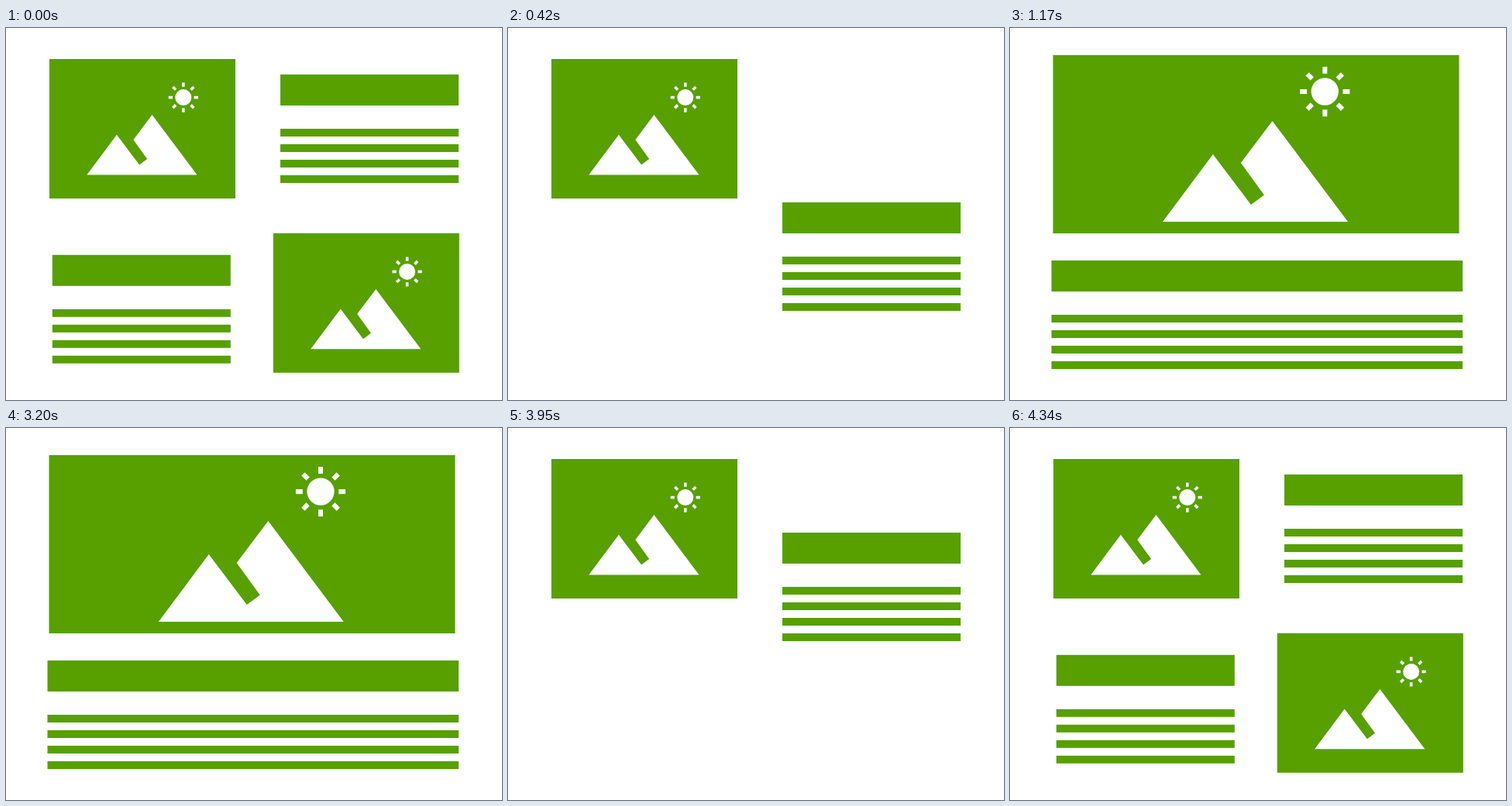
Animation, 640 px wide and 480 px high, one loop 6.34 s. Source, as an HTML page with a canvas:

```html
<!DOCTYPE html>
<html>
<head>
<meta charset="utf-8">
<style>
  html, body { margin: 0; width: 100%; height: 100%; overflow: hidden; background: #fff; }
  canvas { display: block; }
</style>
</head>
<body>
<canvas id="stage" width="640" height="480"></canvas>
<script>
const ctx = document.getElementById('stage').getContext('2d');
const GREEN = '#57a000';
const LOOP = 6340, BACK = 3170, TICK = 30;

// [start, length] of each stage in ticks, opening and closing
const STAGES = {
  row:  [[0, 9],       [30, 9]],
  text: [[10.266, 6],  [22.266, 6]],
  box:  [[19.4, 9],    [12.31, 9]],
  icon: [[28.8, 10.2], [0.7, 11.5]]
};

const PEAKS = [[0, 0], [38.6, -51.8], [67.8, -13.1], [77.9, -20.5],
               [60, -45.2], [84.2, -77.4], [142.2, 0]];

const mix = (a, b, p) => a + (b - a) * p;
const swing = t => (1 - Math.cos(Math.PI * Math.min(1, Math.max(0, t)))) / 2;

function progress(name, ms) {
  const closing = ms >= BACK;
  const tick = Math.floor((closing ? ms - BACK : ms) / TICK);
  const [start, length] = STAGES[name][+closing];
  const p = swing((tick - start) / length);
  return closing ? 1 - p : p;
}

function drawIcon(x, y, scale) {
  ctx.save();
  ctx.translate(x, y);
  ctx.scale(scale, scale);
  ctx.fillStyle = '#fff';
  ctx.beginPath();
  PEAKS.forEach(([px, py]) => ctx.lineTo(px, py));
  ctx.fill();
  ctx.translate(124.5, -99.9);
  ctx.beginPath();
  ctx.arc(0, 0, 10.5, 0, 2 * Math.PI);
  ctx.fill();
  for (let i = 0; i < 8; i++) {
    ctx.fillRect(13.8, -1.8, 5.3, 3.6);
    ctx.rotate(Math.PI / 4);
  }
  ctx.restore();
}

function drawPicture(dx, dy, box, icon) {
  const left = mix(56, 55.5, box), top = mix(40, 35, box);
  ctx.fillStyle = GREEN;
  ctx.fillRect(left + dx, top + dy, mix(296, 579.5, box) - left, mix(220, 265, box) - top);
  drawIcon(mix(104.3, 197, icon) + dx, mix(189.5, 250, icon) + dy, mix(1, 1.681, icon));
}

function drawText(left, right, top) {
  ctx.fillStyle = GREEN;
  ctx.fillRect(left, top, right - left, 40);
  for (let i = 0; i < 4; i++) ctx.fillRect(left, top + 70 + i * 20, right - left, 10);
}

function render(now) {
  const ms = now % LOOP;
  const box = progress('box', ms);
  const drop = progress('row', ms) * 240;
  ctx.fillStyle = '#fff';
  ctx.fillRect(0, 0, 640, 480);
  drawPicture(0, 0, box, progress('icon', ms));
  drawText(mix(354, 53.5, box), 584, Math.round(mix(60, 300, progress('text', ms))));
  drawPicture(288.8, 224.8 + drop, 0, 0);
  drawText(59.8, 289.8, 292.8 + drop);
}

const begin = performance.now();
function loop() {
  render(performance.now() - begin);
  requestAnimationFrame(loop);
}
loop();
</script>
</body>
</html>
```
